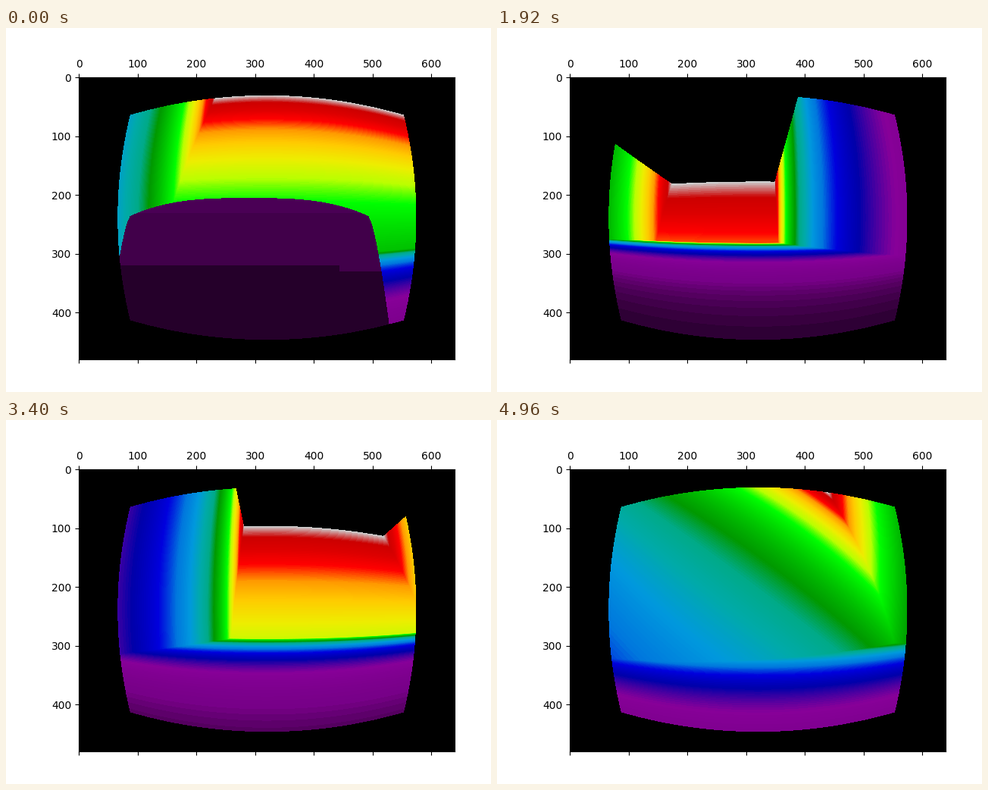
A matplotlib script that plays this animation: 640 by 480 pixels, repeating every 5 s.

```python
import numpy as np
import matplotlib.pyplot as plt
from matplotlib.animation import FuncAnimation

STEP, FRAMES = 40, 125
SCALE = 0.775            # screen pixels per depth-map pixel
W, H = 496, 372          # drawn size of the depth map

# Fixed camera: focal length, upward pitch and the horizon it gives.
FOCAL, PITCH, HORIZON = 0.66, 0.43, 0.161
WALL_HEIGHT = 25.5       # in units of the camera's height

# Screen coordinates and lens-corrected coordinates (u, v in [-1, 1]).
X, Y = np.meshgrid(96.5 + np.arange(W), 65.3 + np.arange(H))
X, Y = X.astype(np.float32), Y.astype(np.float32)
dx, dy = (X - 344.4) / SCALE, (Y - 249.8) / SCALE
r2 = dx ** 2 + dy ** 2
gain = 1 + r2 * (2.68e-6 + 2.03e-11 * r2)
U, V = dx * gain / 320, dy * gain / 240
LENS = (abs(U) < 1) & (abs(V) < 1)

# time, then nearness of left, right and back wall and floor, tan(yaw)
ROUTE = np.array([
    (0, 3.1, 0.5, 1.76, 17.5, 0),
    (1000, 3.1, 0.5, 1.76, 17.5, 0),
    (1920, 2.0, 11, 1.11, 60, 0),
    (3120, 0.8, 0.8, 1.73, 4.5, 0),
    (3760, 17.5, 2.2, 1.09, 72, 0),
    (4360, 9.8, 1.4, 1.25, 43, -0.03),
    (4960, 0.3, 1.7, 2.52, 14.5, 0.288),
])


def room(t):
    """Depth of a box room without a ceiling, scaled to its farthest point."""
    left, right, back, floor, yaw = (np.interp(t, ROUTE[:, 0], col)
                                     for col in ROUTE[:, 1:].T)
    ahead = 1 + PITCH * V
    side = U + FOCAL * yaw * ahead
    wall = np.maximum(np.maximum(-left * side, right * side),
                      back * (ahead - U * yaw / FOCAL))
    ground = floor * (V - HORIZON)
    sky = V - HORIZON < -WALL_HEIGHT / floor * wall
    depth = 1 / np.maximum(np.maximum(wall, ground), 0.1)
    depth[sky | ~LENS] = 0
    return depth / depth.max()


def add_object(depth, t):
    """Rounded object close to the camera, sinking out of view."""
    y = Y - 0.0015 * t - 0.7 * max(t - 1000, 0)
    x = abs(X - 321)
    top = 224 + 24 * np.minimum(x / 158, 1) ** 3
    half = 158 + 26 * (np.maximum(y - 250, 0) / 136) ** 0.7
    near = np.where(y < 313 + 8 * (X > 440),
                    0.03 + 0.005 * np.clip((250 - y) / 25, 0, 1), 0.019)
    inside = (y > top) & (x < half)
    depth[inside] = near[inside]


def add_gap(depth):
    """Broken end of the right wall, with a farther wall behind it."""
    s = X - 502
    gap = (s > 0) & (Y > 191 - 0.67 * s) & (Y < 191 + s ** 3 / 1300)
    depth[gap] = 0
    depth[gap & (s > 28) & (Y > 207)] = 0.79


def add_box(depth, t):
    """Small block on the floor that comes nearer."""
    k = np.clip((t - 3760) / 600, 0, 1)
    size = 2.3 + 2.5 * k
    block = (abs(X - 351.5 - 13 * k) < size) & (abs(Y - 279.5 - 2 * k) < size)
    depth[block] = 0.7 - 0.17 * k


def depth_map(frame):
    t = frame * STEP
    depth = room(t)
    if t < 1320:
        add_object(depth, t)
    if 3640 <= t <= 3960:
        add_gap(depth)
    if 3680 <= t <= 4480:
        add_box(depth, t)
    return np.where(LENS, depth, 0)


fig = plt.figure(figsize=(6.4, 4.8), dpi=100, facecolor="white")
ax = fig.add_axes([0.15, 0.09, 0.775, 0.775])
image = ax.matshow(depth_map(0), cmap="nipy_spectral", vmin=0, vmax=1,
                   extent=(-0.5, 639.5, 479.5, -0.5))


def update(frame):
    image.set_data(depth_map(frame))
    return [image]


anim = FuncAnimation(fig, update, frames=FRAMES, interval=STEP, repeat=True,
                     repeat_delay=0)
plt.show()
```
